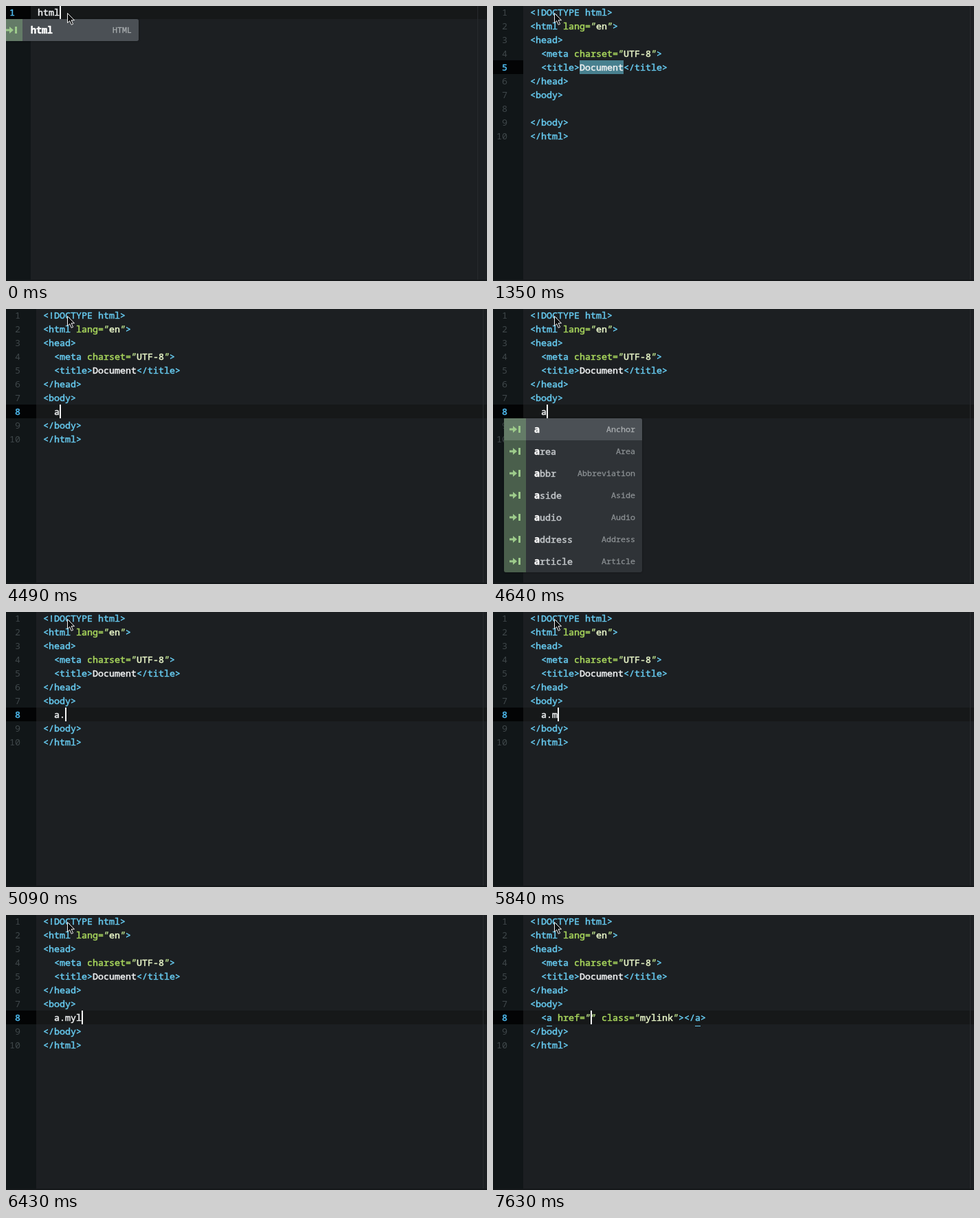
Write an HTML page with a canvas that moves like this. It is 700 px wide and 400 px high and loops after 8 s.

```html
<!DOCTYPE html>
<html lang="en">
<head>
<meta charset="UTF-8">
<title>Snippet expansion in a code editor</title>
<style>
  html, body { margin: 0; width: 100%; height: 100%; overflow: hidden; background: #1c1f22; }
  canvas { display: block; width: 700px; height: 400px; }
</style>
</head>
<body>
<canvas id="stage"></canvas>
<script>
const LOOP = 8000, CELL = 8, ROW = 20, ITEM = 32;
const FAMILY = '"Noto Sans Mono", "DejaVu Sans Mono", monospace';
const COLORS = {
  tag: '#66c9ee', attribute: '#a8d65c', quote: '#bde08c', string: '#e8f5c8', plain: '#eef0f1'
};
const TOKENS = /(?<tag><!.*|<\/?\w+|>)|(?<attribute>\w+=)|(?<quote>")|(?<string>(?<=")[\w-]+)|(?<plain>[^<>"\s]+)/g;

const page = line8 => [
  '<!DOCTYPE html>',
  '<html lang="en">',
  '<head>',
  '  <meta charset="UTF-8">',
  '  <title>Document</title>',
  '</head>',
  '<body>',
  line8,
  '</body>',
  '</html>'
];

// A menu hangs under the word being typed: column, matched letters, entries.
const htmlMenu = { col: 0, match: 4, items: [['html', 'HTML']] };
const aMenu = { col: 2, match: 1, items: [
  ['a', 'Anchor'], ['area', 'Area'], ['abbr', 'Abbreviation'], ['aside', 'Aside'],
  ['audio', 'Audio'], ['address', 'Address'], ['article', 'Article']
] };
const mMenu = { col: 4, match: 1, items: [
  ['map', 'Map'], ['main', 'Main'], ['mark', 'Mark'], ['menu', 'Menu'], ['meter', 'Meter'],
  ['meta', 'Meta'], ['menuitem', 'Menu Item'], ['mailto', 'Mail Anchor']
] };

const typed = text => ({ lines: page('  ' + text), col: 2 + text.length, caret: true });

// Each step changes part of the editor state; pairs are [row, column, length].
const timeline = [
  [0, { lines: ['html'], row: 1, col: 4, caret: true, menu: htmlMenu, pairs: [] }],
  [150, { caret: false }],
  [450, { lines: ['html:'], col: 5, caret: true }],
  [600, { menu: null }],
  [900, { lines: ['html:5'], col: 6 }],
  [1350, { lines: page(''), row: 5, caret: false, selection: [9, 8] }],
  [2700, { row: 6, col: 7, caret: true, selection: null, pairs: [[3, 1, 4], [6, 2, 4]] }],
  [3000, { row: 7, col: 6, pairs: [[7, 1, 4], [9, 2, 4]] }],
  [3290, { row: 8, col: 2, pairs: [] }],
  [3740, { caret: false }],
  [4190, { caret: true }],
  [4490, typed('a')],
  [4640, { menu: aMenu }],
  [4940, typed('a.')],
  [5090, { menu: null }],
  [5390, { caret: false }],
  [5840, typed('a.m')],
  [5980, { menu: mMenu }],
  [6130, typed('a.my')],
  [6280, { menu: null }],
  [6430, typed('a.myl')],
  [6580, typed('a.myli')],
  [6880, typed('a.mylin')],
  [7180, typed('a.mylink')],
  [7630, { lines: page('  <a href="" class="mylink"></a>'), col: 11, pairs: [[8, 3, 1], [8, 30, 1]] }]
];

const canvas = document.getElementById('stage');
const ctx = canvas.getContext('2d');
const ratio = window.devicePixelRatio || 1;
canvas.width = 700 * ratio;
canvas.height = 400 * ratio;
ctx.scale(ratio, ratio);

const rowTop = row => (row - 1) * ROW - 1;

function box(x, y, w, h, color) {
  ctx.fillStyle = color;
  ctx.fillRect(x, y, w, h);
}

// A hairline outline gives regular text a medium weight.
function write(text, x, baseline, color, { style = '', advance = CELL, align = 'left', outline = 0.5 } = {}) {
  ctx.font = `${style} ${advance / 0.6}px ${FAMILY}`;
  ctx.textAlign = align;
  ctx.fillStyle = ctx.strokeStyle = color;
  ctx.fillText(text, x, baseline);
  if (outline) {
    ctx.lineWidth = outline;
    ctx.lineJoin = 'round';
    ctx.strokeText(text, x, baseline);
  }
}

function drawLine(line, x, baseline) {
  for (const token of line.matchAll(TOKENS)) {
    const kind = Object.keys(COLORS).find(name => token.groups[name] !== undefined);
    const slanted = kind === 'quote';
    const left = x + token.index * CELL - (slanted ? 1.5 : 0);
    write(token[0], left, baseline, COLORS[kind], { style: slanted ? 'italic' : '' });
  }
}

function drawEditor(state) {
  const gutter = 28 + CELL * String(state.lines.length).length;
  const left = gutter + 10;
  const top = rowTop(state.row);

  box(0, 0, 700, 400, '#1c1f22');
  box(0, 0, gutter, 400, '#111618');
  if (!state.selection) box(gutter, top, 700 - gutter, ROW, '#161819');
  box(0, top, gutter, ROW, '#030405');
  box(left + 80 * CELL, 0, 1, 400, '#272a2d');
  box(0, 398, 700, 2, '#15181a');

  if (state.selection) {
    const [col, length] = state.selection;
    box(left + col * CELL, top, length * CELL, ROW, '#48808f');
  }
  state.lines.forEach((line, i) => {
    const baseline = rowTop(i + 1) + 15;
    const active = i + 1 === state.row;
    write(i + 1, gutter - 23, baseline, active ? '#4fbdf2' : '#3f474a',
      { align: 'right', outline: active ? 0.5 : 0 });
    drawLine(line, left, baseline);
  });
  for (const [row, col, length] of state.pairs) {
    box(left + col * CELL, rowTop(row) + 22, length * CELL, 1, COLORS.tag);
  }
  if (state.caret) box(left + state.col * CELL, top, 2, ROW, '#f4f4f4');
  if (state.menu) drawMenu(state.menu, left + state.menu.col * CELL - 54, top + ROW);
}

function drawSnippetIcon(x, y) {
  box(x, y - 1.5, 6, 3, '#9dcb8b');
  ctx.beginPath();
  ctx.moveTo(x + 5, y - 5);
  ctx.lineTo(x + 11, y);
  ctx.lineTo(x + 5, y + 5);
  ctx.fill();
  ctx.fillRect(x + 13, y - 5, 3, 10);
}

function drawMenu({ match, items }, x, y) {
  const width = 201, height = items.length * ITEM;
  ctx.save();
  ctx.beginPath();
  ctx.roundRect(x, y, width, height, [0, 3, 3, 3]);
  ctx.shadowColor = 'rgba(0, 0, 0, .35)';
  ctx.shadowBlur = 3 * ratio;
  ctx.fillStyle = '#2f3337';
  ctx.fill();
  ctx.shadowColor = 'transparent';
  ctx.clip();
  items.forEach(([word, label], i) => {
    const top = y + i * ITEM, baseline = top + 21;
    if (i === 0) box(x, top, width, ITEM, '#4b5055');
    box(x, top, 32, ITEM, i === 0 ? '#647b67' : '#4a5f4c');
    drawSnippetIcon(x + 8, top + 16);
    write(word.slice(0, match), x + 44, baseline, '#ffffff', { style: 'bold' });
    write(word.slice(match), x + 44 + match * CELL, baseline, '#c3c7ca');
    write(label, x + 191, baseline - 1, i === 0 ? '#a9adb0' : '#8b9093',
      { advance: 7, align: 'right', outline: 0.3 });
  });
  ctx.restore();
}

function drawPointer() {
  const pointer = new Path2D('M89.5 10.5V24.5L92.7 21.6L95.2 27.3L97.6 26.2L95.1 20.7H99.5Z');
  ctx.fillStyle = '#0b0c0d';
  ctx.fill(pointer);
  ctx.strokeStyle = '#f2f2f2';
  ctx.lineWidth = 1;
  ctx.stroke(pointer);
}

const start = performance.now();
function frame() {
  const time = (performance.now() - start) % LOOP;
  const past = timeline.filter(([at]) => at <= time).map(([, change]) => change);
  drawEditor(Object.assign({}, ...past));
  drawPointer();
  requestAnimationFrame(frame);
}
frame();
</script>
</body>
</html>
```
